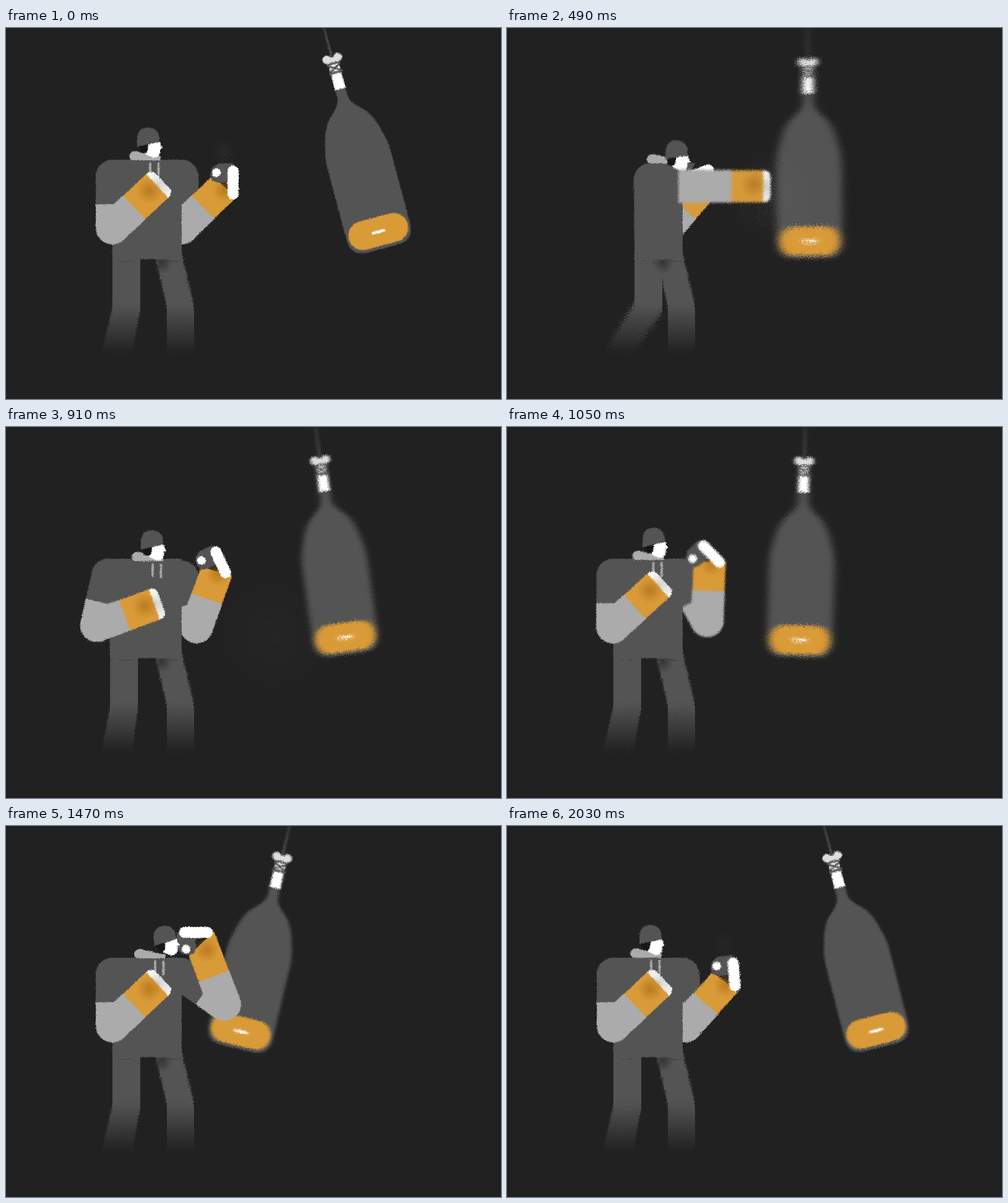
An HTML page for the animation above (2100 ms loop, 800 by 600 pixels).

```html
<!DOCTYPE html>
<html lang="en">
<head>
<meta charset="utf-8">
<title>Boxer and heavy bag</title>
<style>
html, body { margin: 0; width: 100%; height: 100%; overflow: hidden; background: #212121; }
svg { display: block; width: 100vw; height: 100vh; }
</style>
</head>
<body>
<svg id="stage" viewBox="0 0 800 600"></svg>
<script>
const LOOP = 2100, STEP = 70;
const DARK = '#545454', GREY = '#ababab', GOLD = '#d99a38', WHITE = '#fff';
const PIVOT = [484.5, -111], SWING = 14.9, UPPER_ARM = 83, HIT = 430;

// Blur followed by a fine random displacement gives chalky, grainy edges.
const grain = id => `
  <filter id="${id}" x="-25%" y="-25%" width="150%" height="150%" color-interpolation-filters="sRGB">
    <feGaussianBlur stdDeviation="0" result="soft"/>
    <feTurbulence type="fractalNoise" baseFrequency=".8" result="noise"/>
    <feDisplacementMap in="soft" in2="noise" scale="5" xChannelSelector="R" yChannelSelector="G"/>
  </filter>`;

const rect = (x, y, w, h, fill, r = 0) =>
  `<rect x="${x}" y="${y}" width="${w}" height="${h}" rx="${r}" fill="${fill}"/>`;
const dot = (x, y, r, fill) => `<circle cx="${x}" cy="${y}" r="${r}" fill="${fill}"/>`;
const path = (d, fill, more = '') => `<path d="${d}" fill="${fill}" ${more}/>`;
const line = (d, color, width) =>
  path(d, 'none', `stroke="${color}" stroke-width="${width}" stroke-linecap="round"`);

const upperArm = rect(36, -27, 47, 54, DARK) + dot(UPPER_ARM, 0, 27, DARK) + rect(0, -27, 38, 54, GREY);
const foreSleeve = dot(0, 0, 27, GREY) + rect(0, -26.5, 49, 53, GREY);

const stage = document.getElementById('stage');
stage.innerHTML = `
<defs>
  ${['nearFx', 'farFx', 'headFx', 'torsoFx', 'bagFx', 'neckFx'].map(grain).join('')}
  <filter id="fade" x="-10%" y="-10%" width="120%" height="120%" color-interpolation-filters="sRGB">
    <feTurbulence type="fractalNoise" baseFrequency=".8"/>
    <feColorMatrix values="0 0 0 0 .5  0 1 0 0 0  0 0 1 0 0  0 0 0 0 1" result="noise"/>
    <feDisplacementMap in="SourceGraphic" in2="noise" scale="60" xChannelSelector="R" yChannelSelector="G"/>
  </filter>
  <filter id="stipple" x="0" y="0" width="100%" height="100%" color-interpolation-filters="sRGB">
    <feTurbulence type="fractalNoise" baseFrequency=".75"/>
    <feColorMatrix values="0 0 0 0 1  0 0 0 0 1  0 0 0 0 1  6 0 0 0 -2.9" result="specks"/>
    <feComposite in="SourceGraphic" in2="specks" operator="in"/>
  </filter>
  <linearGradient id="legFill" gradientUnits="userSpaceOnUse" x1="0" y1="448" x2="0" y2="526">
    <stop stop-color="${DARK}"/><stop offset="1" stop-color="${DARK}" stop-opacity="0"/>
  </linearGradient>
  <linearGradient id="ropeFill" gradientUnits="userSpaceOnUse" x1="0" y1="105" x2="0" y2="150">
    <stop stop-color="#333"/><stop offset="1" stop-color="#484848"/>
  </linearGradient>
  <radialGradient id="dustFill"><stop stop-color="#888" stop-opacity=".55"/>
    <stop offset=".6" stop-color="#777" stop-opacity=".3"/><stop offset="1" stop-color="#777" stop-opacity="0"/></radialGradient>
  <radialGradient id="shade"><stop stop-color="#212121" stop-opacity=".6"/>
    <stop offset="1" stop-color="#212121" stop-opacity="0"/></radialGradient>
  <radialGradient id="goldShade"><stop stop-color="#a96a14" stop-opacity=".65"/>
    <stop offset="1" stop-color="#a96a14" stop-opacity="0"/></radialGradient>
  <linearGradient id="handFill" x1="0" x2="0" y1="0" y2="1">
    <stop stop-color="${WHITE}"/><stop offset=".5" stop-color="#d8d8d8"/><stop offset="1" stop-color="#f4f4f4"/>
  </linearGradient>
</defs>
${rect(0, 0, 800, 600, '#212121')}
<g id="bag">
  <g filter="url(#bagFx)">
    ${path('M-8 215L-9 234Q-12 245-26 256Q-41 270-48 302Q-53 318-53 335V455Q-53 484-24 484H24Q53 484 53 455V335Q53 318 48 302Q41 270 26 256Q12 245 9 234L8 215Z', DARK)}
    ${rect(-49, 432, 98, 47, GOLD, 23)}
    ${line('M-9 456H9', WHITE, 4.5)}
  </g>
  <g filter="url(#neckFx)">
    ${rect(-2, 95, 4, 70, 'url(#ropeFill)')}
    ${path('M-8 171H8L9 217H-9Z', WHITE)}
    ${line('M-10 174H10M-9 177L9 187M9 177L-9 187M-10 189H10', DARK, 3.5)}
    ${dot(-9, 166, 7, '#ddd') + dot(9, 166, 7, '#ddd') + rect(-9, 164, 18, 8, '#ddd')}
  </g>
</g>
<ellipse id="smoke" rx="20" ry="24" fill="url(#dustFill)" filter="url(#stipple)"/>
<g filter="url(#farFx)">
  <g id="farUpper">${upperArm}</g>
  <g id="farFore">${foreSleeve}<path id="farGlove" fill="${GOLD}"/>${dot(92, 4, 20, 'url(#goldShade)')}</g>
  <g id="farHand">
    ${path('M0-31H-24L-34-24L-37-12L-34-3L-24 0H0Z', DARK)}
    ${dot(-27, -16, 7, WHITE)}
    ${rect(-9, -27.5, 18, 55, WHITE, 9)}
  </g>
</g>
<g filter="url(#fade)">
  ${path('M240 366H284L304 450V526H260V450Z', 'url(#legFill)')}
  <path id="nearLeg" fill="url(#legFill)"/>
</g>
<ellipse cx="252" cy="380" rx="17" ry="18" fill="url(#shade)"/>
<g filter="url(#torsoFx)">
  <path id="torso" fill="${DARK}"/>
  <circle id="nearShoulder" r="27" fill="${DARK}"/>
</g>
<g filter="url(#headFx)">
  <g id="hood">${path('M199 207Q201 198 210 199L235 205L250 208L250 214H204Q200 213 199 207Z', GREY)}</g>
  <g id="strings">${line('M232 219V238M245.5 219V240', GREY, 3.5)}</g>
  <g id="head">
    ${path('M215 190L230 186L229 199Q224 204 217 201Z', '#161616')}
    ${path('M230 188L249 184L250 189L253 194L249 196L249 202Q247 210 238 210L225 204L229 198Z', WHITE)}
    ${path('M212 192V179Q213 161 230 161Q247 162 248 179V184Z', DARK)}
  </g>
</g>
<g filter="url(#nearFx)">
  <g id="nearUpper">${upperArm}</g>
  <g id="nearFore">
    ${rect(84, -26, 27, 52, 'url(#handFill)', 10)}
    ${foreSleeve + rect(48, -26, 51, 52, GOLD) + dot(84, -3, 21, 'url(#goldShade)')}
  </g>
</g>
<circle id="dust" fill="url(#dustFill)" filter="url(#stipple)"/>`;

const el = id => document.getElementById(id);
const set = (id, attrs) => { for (const k in attrs) el(id).setAttribute(k, attrs[k]); };
const place = (id, x, y, turn = 0) => set(id, { transform: `translate(${x} ${y}) rotate(${turn})` });
const clamp = v => Math.max(0, Math.min(1, v));
const ease = v => (1 - Math.cos(Math.PI * clamp(v))) / 2;

// Rows of [time, ...values], eased between neighbours.
function track(rows, t) {
  let i = 0;
  while (i < rows.length - 2 && t >= rows[i + 1][0]) i++;
  const a = rows[i], b = rows[i + 1], k = ease((t - a[0]) / (b[0] - a[0]));
  return a.slice(1).map((v, n) => v + (b[n + 1] - v) * k);
}

// lean, upper arm angle, forearm angle
const PUNCH = [
  [0, 0, 90, -43], [180, 0, 90, -43], [280, -.1, 94, -15], [350, -.14, 112, -25], [490, 1, 0, 0],
  [700, 1, 0, 0], [840, -.1, 112, -12], [910, -.11, 103, -20], [1070, 0, 90, -43], [LOOP, 0, 90, -43]];
// elbow x, y, forearm angle, hand x, y, hand angle, glove reach
const GUARD = [
  [0, 284, 323, -44, 367, 250, 0, 0], [280, 285, 323, -43, 366, 250, 0, 0],
  [490, 254, 328, -49, 308, 236, -110, 0], [700, 254, 328, -49, 308, 236, -110, 0],
  [910, 308, 323, -70, 347, 219, -25, 0], [1190, 339, 303, -105, 314, 192, -64, 0],
  [1450, 353, 288, -110.7, 307, 172, -90, 1], [1750, 353, 288, -110.7, 307, 172, -90, 1],
  [2030, 289, 323, -48, 367, 240, -5, 0], [LOOP, 284, 323, -44, 367, 250, 0, 0]];
// head x, y, turn, hood x, y
const HEAD = [
  [0, 0, 0, 0, 0, 0], [180, 0, 0, 0, 0, 0], [280, 8, 3, 0, 5, 0], [350, 5, 5, 0, 4, 2],
  [490, 43, 21, 4, 27, 5], [700, 43, 21, 4, 27, 5], [910, 6, 6, 0, 4, 3], [1190, 9, -2, -3, 3, -1],
  [1450, 28, 0, -5, 8, 0], [1750, 28, 0, -5, 8, 0], [2030, 2, -1, 0, 0, -1], [LOOP, 0, 0, 0, 0, 0]];

const fall = t => SWING * Math.cos(Math.PI * t / 660);
function bagAngle(t) {
  if (t < HIT) return fall(t);
  if (t < 700) return fall(HIT) + (SWING - fall(HIT)) * Math.sin(Math.PI / 2 * (t - HIT) / (700 - HIT));
  if (t < 1360) return fall(t - 700);
  return -SWING * Math.cos(Math.PI * (t - 1360) / (LOOP - 1360));
}

const polar = (x, y, r, deg) => [x + r * Math.cos(deg * Math.PI / 180), y + r * Math.sin(deg * Math.PI / 180)];

function nearArm(t) {
  const [lean, upper, fore] = track(PUNCH, t);
  const elbow = polar(172 + 60 * lean, 240 + 16 * Math.max(0, lean), UPPER_ARM, upper);
  return { lean, upper, fore, elbow, wrist: polar(...elbow, 70, fore) };
}

// Distance moved by a point during one picture.
function travel(point, t) {
  const a = point(Math.max(0, t - STEP / 2)), b = point(Math.min(LOOP, t + STEP / 2));
  return [Math.abs(b[0] - a[0]), Math.abs(b[1] - a[1])];
}
function blur(id, [dx, dy], k) {
  const sx = Math.min(6, dx * k), sy = Math.min(6, dy * k);
  const filter = el(id);
  filter.children[0].setAttribute('stdDeviation', `${sx} ${sy}`);
  filter.children[2].setAttribute('scale', 5 + 3.5 * Math.max(sx, sy));
}

function draw(t) {
  const angle = bagAngle(t);
  place('bag', ...PIVOT, -angle);
  const sweep = travel(s => [bagAngle(s), 0], t)[0];
  blur('bagFx', [sweep, 0], 1.05);
  blur('neckFx', [sweep, 0], .5);

  const { lean, upper, fore, elbow } = nearArm(t);
  const push = Math.max(0, lean);
  place('nearUpper', ...elbow, upper + 180);
  place('nearFore', ...elbow, fore);
  blur('nearFx', travel(s => nearArm(s).wrist, t), .11);

  const shoulder = 172 + 60 * lean, farShoulder = 284 + 21 * push;
  const top = 213 + 5 * push, hip = 172 + 34 * lean;
  const side = shoulder - 27 * push;
  set('torso', { d: `M${shoulder} ${top}H${farShoulder}L284 ${top + 30}V374H${hip}L${side} ${top + 27}Z` });
  set('nearShoulder', { cx: shoulder, cy: top + 27 });
  set('nearLeg', { d: `M${hip} 366H${hip + 45}V${456 + 3 * push}L203 526H154L${hip} ${452 - 7 * push}Z` });

  const [ex, ey, farFore, hx, hy, turn, reach] = track(GUARD, t);
  const farUpper = Math.atan2(top + 27 - ey, farShoulder - ex) * 180 / Math.PI;
  place('farUpper', ex, ey, farUpper);
  place('farFore', ex, ey, farFore);
  place('farHand', hx, hy, turn);
  set('farGlove', { d: `M48-26H94L${97 + 19 * reach} 26H48Z` });
  blur('farFx', travel(s => track(GUARD, s).slice(3, 5), t), .1);

  const [x, y, tilt, hoodX, hoodY] = track(HEAD, t);
  set('head', { transform: `translate(${x} ${y}) rotate(${tilt} 232 195)` });
  place('hood', hoodX, hoodY);
  set('strings', { transform: `translate(${hoodX + 1} ${hoodY})`, opacity: 1 - clamp(push * 3) });
  blur('headFx', travel(s => track(HEAD, s).slice(0, 2), t), .12);

  const age = (t - HIT) / 270;
  set('dust', {
    cx: 430, cy: 262 + 42 * age, r: 55 + 48 * Math.sqrt(clamp(age)),
    opacity: age < 0 ? 0 : .62 * clamp((1050 - t) / 350) * clamp(age * 4)
  });
  set('smoke', { cx: hx - 15, cy: hy - 48, opacity: t < 420 ? .45 * clamp((420 - t) / 300) : .45 * clamp((t - 1930) / 150) });
}

const start = performance.now();
let shown = -1;
function tick() {
  const t = Math.floor(((performance.now() - start) % LOOP) / STEP) * STEP;
  if (t !== shown) draw(shown = t);
  requestAnimationFrame(tick);
}
tick();
</script>
</body>
</html>
```
